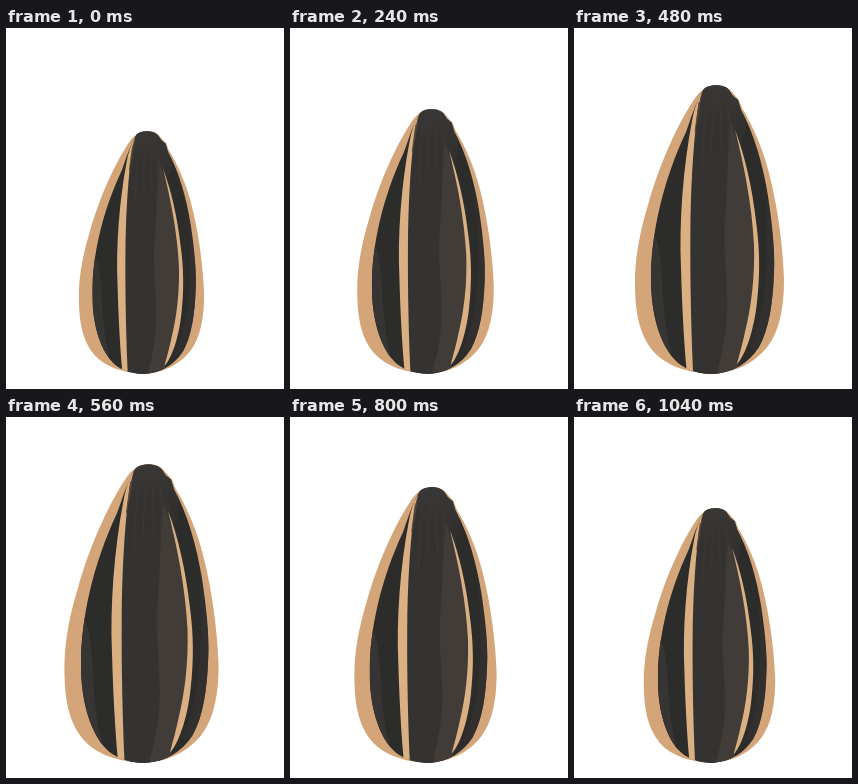
An HTML page for the animation above (1120 ms loop, 278x361 px).

```html
<!DOCTYPE html>
<html>
<head>
<meta charset="utf-8">
<style>
html, body { margin: 0; width: 100%; height: 100%; overflow: hidden; background: #fff; }
svg { display: block; width: 100vw; height: 100vh; }
</style>
</head>
<body>
<svg viewBox="0 0 278 361">
  <defs>
    <linearGradient id="cap" x1="0" y1="0" x2="0" y2="1">
      <stop offset="0" stop-color="#393836"/>
      <stop offset=".4" stop-color="#343331" stop-opacity=".9"/>
      <stop offset="1" stop-color="#2f2e2d" stop-opacity="0"/>
    </linearGradient>
    <clipPath id="shell">
      <path d="M131 61 C136 56 151 56 156 62 L160 68 L165 72 L168 82 C181 105 190 137 195 168 C199 195 202 220 201 244 C200 275 196 301 186 319 C176 335 160 345 139 346 C124 346 109 340 102 332 C87 316 78 286 78 251 C78 205 90 153 113 104 C118 91 122 75 131 61Z"/>
    </clipPath>
  </defs>
  <g id="seed">
    <path fill="#d3a578" d="M142 57 C133 57 127 62 121 70 C104 95 85 137 74 177 C66 203 61 229 61 254 C61 284 65 306 79 323 C92 338 115 345.500 138 345.500 C160 345.500 181 335 194 318 C206 302 210 278 210 252 C209 220 204 180 195 145 C189 121 179 98 168 80 L165 72 L158 64 C153 58 148 57 142 57Z"/>
    <g transform="translate(-1 0)">
      <g clip-path="url(#shell)">
        <rect x="55" y="50" width="160" height="300" fill="#2c2c2b"/>
        <path fill="#363533" d="M76 200 C86 205 89 235 90 270 C92 292 93 312 103 340 L70 330Z"/>
        <path fill="#343331" d="M128 62 L158 70 C167 110 183 170 184 230 C184 280 172 320 160 346 L118 346 C114 270 116 160 124 80Z"/>
        <path fill="#413c37" d="M153 80 C156 120 155 155 152 190 C150 215 153 240 154 268 C155 300 150 320 144 346 L164 340 C178 305 185 265 182 222 C180 180 171 135 161 100Z"/>
        <path fill="#353331" d="M190 145 C196 195 197 270 181 310 L176 322 L194 320 L206 250Z" opacity=".7"/>
        <path fill="url(#cap)" d="M126 56 H172 V108 L165 118 L158 96 L155 135 L149 105 L145 142 L139 108 L134 138 L130 105 L124 130Z"/>
        <path d="M134 76 Q130 105 129 142M142 72 Q139 95 138 124M148 78 Q147 100 149 126M154 76 Q157 94 159 112" fill="none" stroke="#454039" stroke-width=".8" opacity=".6"/>
      </g>
      <g fill="#dab083">
        <path d="M129 64 C124 72 121 82 119 93 C110 140 106 195 108 240 C109 277 111 314 113.500 341 L120 343 C117.500 285 117 235 117.500 190 C118.500 145 121 110 125 80Z"/>
        <path d="M162 102 C171 137 179 177 181 217 C182 250 178 280 172 304 C169 318 166 328 164 336 C172 328 181 303 184 274 C187 247 187 222 183 193 C179 159 172 128 162 102Z"/>
      </g>
      <path d="M126 74 L122 104M128 69 L124 94" fill="none" stroke="#5a4838"/>
    </g>
  </g>
</svg>
<script>
const seed = document.getElementById("seed");
const STEP = 80, PEAK = 7, BASE = 345.5, FULL = 288.5, CENTER = 135.5;
// Height of the tip at each step of the growth; the shrink mirrors it.
const tips = [103, 91, 86, 81, 70, 64, 57, 47];

function draw(time) {
  const step = Math.floor(time / STEP) % (2 * PEAK);
  const tip = tips[PEAK - Math.abs(PEAK - step)];
  const scale = (BASE - tip) / FULL;
  seed.setAttribute("transform",
    `translate(${CENTER} ${BASE}) scale(${scale}) translate(${-CENTER} ${-BASE})`);
}

const start = performance.now();
function tick() {
  draw(performance.now() - start);
  requestAnimationFrame(tick);
}
tick();
</script>
</body>
</html>
```
